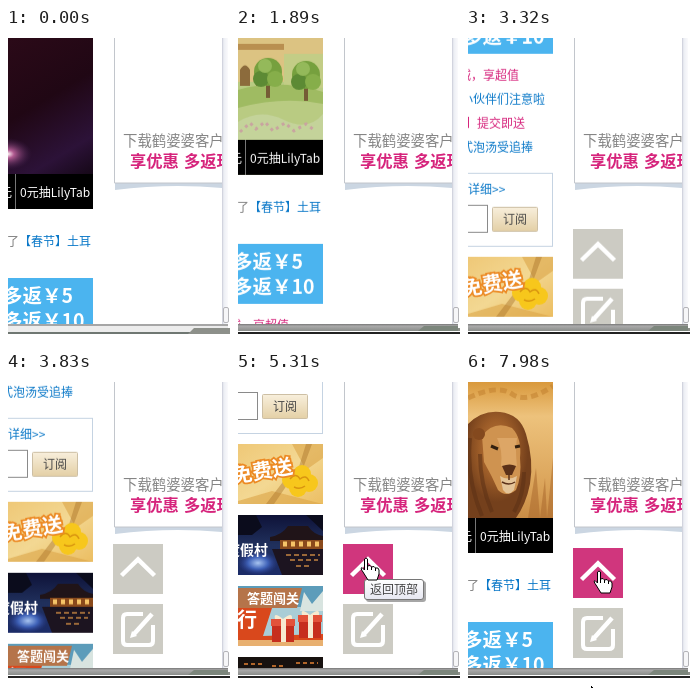
Write an HTML page that moves like this. It is 224 by 316 pixels and loops after 8000 ms.

```html
<!DOCTYPE html>
<html lang="zh">
<head>
<meta charset="utf-8">
<style>
html, body { margin: 0; width: 224px; height: 316px; overflow: hidden; background: #fff; }
svg { display: block; }
text { font: 12px "Noto Sans CJK SC", "Noto Sans CJK", "Noto Sans", sans-serif; white-space: pre; }
.b { font-weight: bold; }
.pink { fill: #d6247c; }
.blue { fill: #0a78c8; }
.white { fill: #fff; }

.page, .tools, .b1, .b2, .garden, .lion, .bar, .cursor, .arrow, .hand, .tip1, .tip2, .speck {
  animation: 8s linear infinite;
}
.page { animation-name: page; }
.tools { animation-name: tools; }
.b1 { animation-name: b1; }
.b2 { animation-name: b2; }
.garden { animation-name: garden; }
.bar { animation-name: bar; }
.cursor { animation-name: cursor; }
.lion { animation-name: lion; }
.arrow { animation-name: arrow; }
.hand { animation-name: hand; }
.tip1 { animation-name: tip1; }
.tip2 { animation-name: tip2; }
.speck { animation-name: speck; }
.lion, .arrow, .hand, .tip1, .tip2, .speck { animation-timing-function: step-end; }

@keyframes page {
  0%, 22.5% { transform: translateY(0); }
  23.625% { transform: translateY(-34px); }
  32.875% { transform: translateY(-160px); }
  41.5% { transform: translateY(-284px); }
  47.875% { transform: translateY(-383px); }
  51.25% { transform: translateY(-441px); }
  93% { transform: translateY(-441px); animation-timing-function: cubic-bezier(.36, 0, .64, 1); }
  98.6%, 100% { transform: translateY(0); }
}
@keyframes tools {
  0% { transform: translateY(124px); }
  38.33% { transform: translateY(124px); animation-timing-function: cubic-bezier(.36, 0, .64, 1); }
  43% { transform: translateY(0); }
  99.2% { transform: translateY(0); }
  99.75%, 100% { transform: translateY(4px); }
}
@keyframes b1 {
  0%, 59.5% { fill: #cccbc3; }
  63.25%, 71.75% { fill: #d0367d; }
  75.5%, 84.3% { fill: #cccbc3; }
  88.3%, 100% { fill: #d0367d; }
}
@keyframes b2 {
  0%, 72.5% { fill: #cccbc3; }
  76.25%, 83.75% { fill: #d0367d; }
  87.5%, 100% { fill: #cccbc3; }
}
@keyframes garden {
  0%, 10.6% { opacity: 0; }
  20%, 100% { opacity: 1; }
}
@keyframes bar {
  0%, 6% { opacity: 0; }
  7.6%, 100% { opacity: 1; }
}
@keyframes cursor {
  0%, 56.6% { transform: translate(230px, 10px); animation-timing-function: ease-out; }
  60.4%, 70.8% { transform: translate(130px, 186px); }
  73.75%, 82.3% { transform: translate(140px, 250px); }
  85.75% { transform: translate(132px, 202px); }
  86.25%, 100% { transform: translate(133px, 199px); }
}
@keyframes lion { 0% { opacity: 0; } 70% { opacity: 1; } }
@keyframes arrow { 0% { opacity: 0; } 56.6% { opacity: 1; } 59.4% { opacity: 0; } }
@keyframes hand { 0% { opacity: 0; } 59.4% { opacity: 1; } }
@keyframes tip1 { 0% { opacity: 0; } 66.3% { opacity: 1; } 70.85% { opacity: 0; } }
@keyframes tip2 { 0% { opacity: 0; } 79.1% { opacity: 1; } 82.35% { opacity: 0; } }
@keyframes speck { 0% { opacity: 0; } 99.3% { opacity: 1; } }
</style>
</head>
<body>
<svg width="224" height="316" viewBox="0 0 224 316">
  <defs>
    <clipPath id="column"><rect x="2" y="10" width="85" height="286"/></clipPath>
    <clipPath id="side"><rect x="100" y="10" width="116" height="286"/></clipPath>
    <clipPath id="slide"><rect x="2" y="10" width="85" height="171"/></clipPath>
    <clipPath id="gold"><rect x="2" y="513" width="85" height="60"/></clipPath>
    <linearGradient id="dusk" x2="0.3" y2="1">
      <stop stop-color="#2b0a18"/><stop offset=".45" stop-color="#200714"/>
      <stop offset=".8" stop-color="#2c1238"/><stop offset="1" stop-color="#160818"/>
    </linearGradient>
    <radialGradient id="glow">
      <stop stop-color="#fff0f4"/><stop offset=".25" stop-color="#b05a90"/>
      <stop offset="1" stop-color="#402050" stop-opacity="0"/>
    </radialGradient>
    <radialGradient id="mane" cx=".45" cy=".35">
      <stop stop-color="#c07c3c"/><stop offset=".55" stop-color="#9c5c28"/><stop offset="1" stop-color="#74401c"/>
    </radialGradient>
    <linearGradient id="sand" x2="0" y2="1">
      <stop stop-color="#d9993c"/><stop offset=".2" stop-color="#edc27c"/>
      <stop offset=".6" stop-color="#dba45a"/><stop offset="1" stop-color="#b87430"/>
    </linearGradient>
    <linearGradient id="cream" x2="0" y2="1">
      <stop stop-color="#f8efdc"/><stop offset="1" stop-color="#e4d0a6"/>
    </linearGradient>
    <linearGradient id="amber" x2="1" y2="1">
      <stop stop-color="#efc877"/><stop offset=".5" stop-color="#f3d893"/><stop offset="1" stop-color="#ecbe62"/>
    </linearGradient>
    <linearGradient id="night" x2="0" y2="1">
      <stop stop-color="#0e1238"/><stop offset=".5" stop-color="#20305c"/><stop offset="1" stop-color="#1c2c68"/>
    </linearGradient>
    <radialGradient id="lake">
      <stop stop-color="#a8c4f0"/><stop offset=".5" stop-color="#3f62b8"/><stop offset="1" stop-color="#2a3c90" stop-opacity="0"/>
    </radialGradient>
    <linearGradient id="steel" x2="0" y2="1">
      <stop stop-color="#777"/><stop offset=".3" stop-color="#aaa"/><stop offset="1" stop-color="#8a8d8a"/>
    </linearGradient>
    <linearGradient id="edge"><stop stop-color="#c8cad6"/><stop offset=".3" stop-color="#eceef4"/><stop offset="1" stop-color="#fafafc"/></linearGradient>
    <linearGradient id="hint" x2="0" y2="1"><stop stop-color="#fff"/><stop offset="1" stop-color="#e6e7f1"/></linearGradient>
    <g id="tree">
      <path d="M-2 0h4v24h-4z" fill="#755c35"/>
      <circle cy="-2" r="14" fill="#76a03e"/>
      <circle cx="-7" cy="5" r="8" fill="#5c8a34"/>
      <circle cx="7" cy="5" r="8" fill="#86ae4a"/>
      <circle cx="-3" cy="-8" r="7" fill="#94b95a"/>
    </g>
    <g id="gift">
      <path d="M0 0h22v18H0z" fill="#c62e1e"/>
      <path d="M-1-5h24v7H-1z" fill="#e2523a"/>
      <path d="M9-5h5v23H9z" fill="#f7ead0"/>
      <path d="M11-5q-10-8-8 0zm0 0q10-8 9 0z" fill="#f7ead0"/>
    </g>
    <g id="hint-box">
      <rect x="2" y="2" width="60" height="21" rx="3" fill="#000" opacity=".35"/>
      <rect x=".5" y=".5" width="59" height="20" rx="2.500" fill="url(#hint)" stroke="#767676"/>
    </g>
  </defs>

  <rect width="224" height="316" fill="#fff"/>

  <g clip-path="url(#column)">
    <g class="page">
      <g clip-path="url(#slide)">
        <rect x="2" y="10" width="85" height="171" fill="url(#dusk)"/>
        <ellipse cx="2" cy="126" rx="24" ry="16" fill="url(#glow)"/>
        <g class="garden">
          <rect x="2" y="10" width="85" height="171" fill="#b9cb82"/>
          <path d="M2 10h85v56l-30 22h-55z" fill="#dcc382"/>
          <path d="M2 50h46v6h-46z" fill="#b98f50"/>
          <path d="M4 92v-16q5-9 10 0v16zm16 0v-18q5-9 10 0v18zm17 0v-18q4-8 8 0v18z" fill="#8c6b3c"/>
          <path d="M48 60h39v34h-39z" fill="#c3cd86"/>
          <path d="M2 96q40-12 85 2v12q-40-8-85 4z" fill="#9fbb62"/>
          <use href="#tree" x="32" y="80"/>
          <use href="#tree" x="70" y="83"/>
          <path d="M2 128q22-14 46-2t39-6v26h-85z" fill="#c4d39a"/>
          <path d="M4 138l10-9 6 6 9-7 8 9 12-8 9 8 12-7 8 6" fill="none" stroke="#c9a4a0" stroke-width="3" stroke-dasharray="3 4"/>
        </g>
        <g class="lion">
          <rect x="2" y="10" width="85" height="171" fill="url(#sand)"/>
          <path d="M2 26q30-14 44-4t41-8" fill="none" stroke="#c07e2c" stroke-width="5" stroke-dasharray="7 4" opacity=".5"/>
          <path d="M62 146l8-50 4 50 5-40 2 40 6-60v60z" fill="#a8662a" opacity=".5"/>
          <path d="M2 52Q16 38 34 40Q54 42 60 62Q68 88 64 112Q60 132 50 146H2z" fill="url(#mane)"/>
          <path d="M4 66q-4 40 12 78m-2-62q0 30 12 58m32-40q0 22-10 40" fill="none" stroke="#5c3014" stroke-width="4" opacity=".55"/>
          <path d="M16 64Q28 48 46 56Q56 66 54 86Q56 104 50 118Q40 126 32 118Q26 104 18 90z" fill="#cf9350"/>
          <circle cx="13" cy="62" r="6" fill="#84491e"/>
          <path d="M31 66q6 12 4 28h16q-2-16 0-28z" fill="#dda666"/>
          <path d="M36 94q8-3 14 0l-4 9h-6z" fill="#5a3018"/>
          <path d="M34 104q8 5 17 0l-3 14q-6 7-11 0z" fill="#e4c498"/>
          <path d="M43 102v6m-7 2q7 4 13 0" fill="none" stroke="#5a3018" stroke-width="1.500"/>
          <path d="M25 74l7 3m17-2l5-1" stroke="#33200f" stroke-width="3"/>
        </g>
        <rect x="2" y="146" width="85" height="35" fill="#000"/>
        <path d="M9.500 146v35" stroke="#777"/>
        <text x="-6" y="168.500" class="white">元</text>
        <text x="14" y="168.500" class="white">0元抽LilyTab</text>
      </g>

      <text x="1" y="217.500" fill="#777">了</text>
      <text x="13" y="217.500" class="blue">【春节】土耳</text>

      <rect x="2" y="250" width="85" height="60" fill="#4bb4ef"/>
      <g class="white">
        <text x="-3" y="275" class="b" style="font-size:19.500px">多返￥5</text>
        <text x="-3" y="300" class="b" style="font-size:19.500px">多返￥10</text>
      </g>

      <text x="-7" y="335.500" class="pink">减，享超值</text>
      <text x="-5" y="359.500" class="blue">小伙伴们注意啦</text>
      <text x="-1" y="383.500" class="pink">】提交即送</text>
      <text x="-5" y="407.500" class="blue">式泡汤受追捧</text>

      <rect x="-10" y="429.500" width="96.500" height="73" fill="#fff" stroke="#c5d3e2"/>
      <text x="2" y="449.500" class="blue">详细&gt;&gt;</text>
      <rect x="-5" y="461.500" width="26.500" height="27" fill="#fff" stroke="#8a8a8a"/>
      <rect x="26.500" y="463.500" width="45" height="24" rx="1" fill="url(#cream)" stroke="#cdbfa4"/>
      <text x="37" y="480" fill="#444">订阅</text>

      <g clip-path="url(#gold)">
        <rect x="2" y="513" width="85" height="60" fill="url(#amber)"/>
        <path d="M2 570l34-10 51 13H2zM56 513l14 26 17-12v-14z" fill="#dca548" opacity=".6"/>
        <path d="M30 573l26-34 4 2-22 32zM70 513l-8 26 4 1 10-27z" fill="#a8742c" opacity=".45"/>
        <g fill="#f7c71c">
          <circle cx="55" cy="549" r="9"/><circle cx="66" cy="543" r="9"/>
          <circle cx="73" cy="552" r="9"/><circle cx="62" cy="557" r="9"/>
        </g>
        <path d="M54 548q6-7 10 0 6-5 9 2m-15 6q6 3 11-1" fill="none" stroke="#d99410" stroke-width="1.500"/>
        <text x="-3" y="552" class="b white" transform="rotate(-10 0 552)" stroke="#ec8a24" stroke-width="3.500" paint-order="stroke" style="font-size:20.500px">免费送</text>
      </g>

      <rect x="2" y="584" width="85" height="60" fill="url(#night)"/>
      <path d="M2 584h18l6 12-10 8H2zM70 584h17v16z" fill="#0b0c1c"/>
      <ellipse cx="22" cy="632" rx="20" ry="12" fill="url(#lake)"/>
      <path d="M34 606q12-2 18-11h20q5 8 15 10v5H34z" fill="#201418"/>
      <path d="M44 609h43v9H44z" fill="#8a4a1c"/>
      <path d="M47 613h40" stroke="#f6c468" stroke-width="5" stroke-dasharray="4 4"/>
      <path d="M36 618h51v26H46z" fill="#1c1420"/>
      <path d="M50 624h34m-30 5h28m-22 6h14" stroke="#d08c44" stroke-width="2" stroke-dasharray="5 3" opacity=".7"/>
      <text x="-10" y="624" class="b white" style="font-size:14px">度假村</text>

      <rect x="2" y="655" width="85" height="60" fill="#5c9cba"/>
      <path d="M2 676h85v39H2z" fill="#a9cdd6"/>
      <path d="M2 657h64l-5 20H2z" fill="#b5744a"/>
      <path d="M68 661l8 12 11-13v20H64z" fill="#d8e4e0"/>
      <path d="M2 677h34l-9 28 60-2v12H2z" fill="#d9481c"/>
      <path d="M2 709h85v6H2z" fill="#e8b070"/>
      <text x="11" y="672" class="b white" style="font-size:13px">答题闯关</text>
      <text x="1" y="696" class="b white" style="font-size:20px">行</text>
      <use href="#gift" x="36" y="693"/>
      <use href="#gift" x="63" y="689"/>

      <rect x="2" y="726" width="85" height="60" fill="#17110f"/>
      <path d="M8 733h20m8 2h14m10-3h22" stroke="#b0652a" stroke-width="2" stroke-dasharray="4 3"/>
    </g>
  </g>

  <g clip-path="url(#side)">
    <path d="M109 154h108v6q-54-5-108 2z" fill="#cbd6e2"/>
    <path d="M108.500 10v145H217" fill="#fff" stroke="#c2c6cc"/>
    <text x="117" y="118" fill="#858585" style="font-size:14.400px;font-weight:500">下载鹤婆婆客户</text>
    <g class="pink">
      <text x="124" y="138.500" class="b" style="font-size:16.300px">享优惠</text>
      <text x="178" y="138.500" class="b" style="font-size:16.300px">多返现</text>
    </g>
    <g class="tools">
      <rect class="b1" x="107" y="172" width="50" height="50"/>
      <rect class="b2" x="107" y="232" width="50" height="50"/>
      <g fill="none" stroke="#fff" stroke-width="4">
        <path d="M115.500 203.500l16.500-16 16.500 16" stroke-width="4.500"/>
        <path d="M137 242h-16q-4 0-4 4v23q0 4 4 4h22q4 0 4-4v-16"/>
        <path d="M128 262l18-20" stroke-width="4.500"/>
      </g>
      <path d="M124 266l2-7 5 5z" fill="#fff"/>
    </g>
  </g>

  <rect x="216" y="10" width="6" height="286" fill="url(#edge)"/>
  <rect x="217.500" y="279.500" width="5" height="15" rx="1.500" fill="#f6f6f8" stroke="#b4b4b8"/>

  <path d="M2 296h220v2H2z" fill="#a6a6a6"/>
  <path d="M2 298h220v6H2z" fill="#ececec"/>
  <path d="M2 304h222v2H2z" fill="#6f7772"/>
  <path d="M182 306l6-6h36v6z" fill="#8d908a"/>
  <g class="bar">
    <path d="M2 296h220v7H2z" fill="url(#steel)"/>
    <path d="M182 303l6-5h34v5z" fill="#7c867c"/>
    <path d="M2 303h222v1H2z" fill="#fff"/>
    <path d="M2 304h222v2H2z" fill="#222"/>
  </g>

  <g class="tip1">
    <use href="#hint-box" x="128" y="207"/>
    <text x="134" y="222" fill="#444">返回顶部</text>
  </g>
  <g class="tip2">
    <use href="#hint-box" x="138" y="271"/>
    <text x="144" y="286" fill="#444">意见反馈</text>
  </g>

  <g class="cursor" fill="#fff" stroke="#000" stroke-linejoin="round">
    <path class="arrow" d="M0 0v16l4-4 3 7 3-1-3-7h5z"/>
    <g class="hand">
      <path d="M-1.500 1Q0-1 1.500 1V8q3-1.500 4 1 3-1.500 4 1 3-1 3.500 2v4l-2 6h-9l-5-8q-3-4-1-4.500l2.500 2.500z"/>
      <path d="M1.500 8v4m4-3v3m4-2v3" fill="none"/>
    </g>
  </g>
  <path class="speck" d="M125 314h1v1h1v1h-2z"/>
</svg>
</body>
</html>
```
